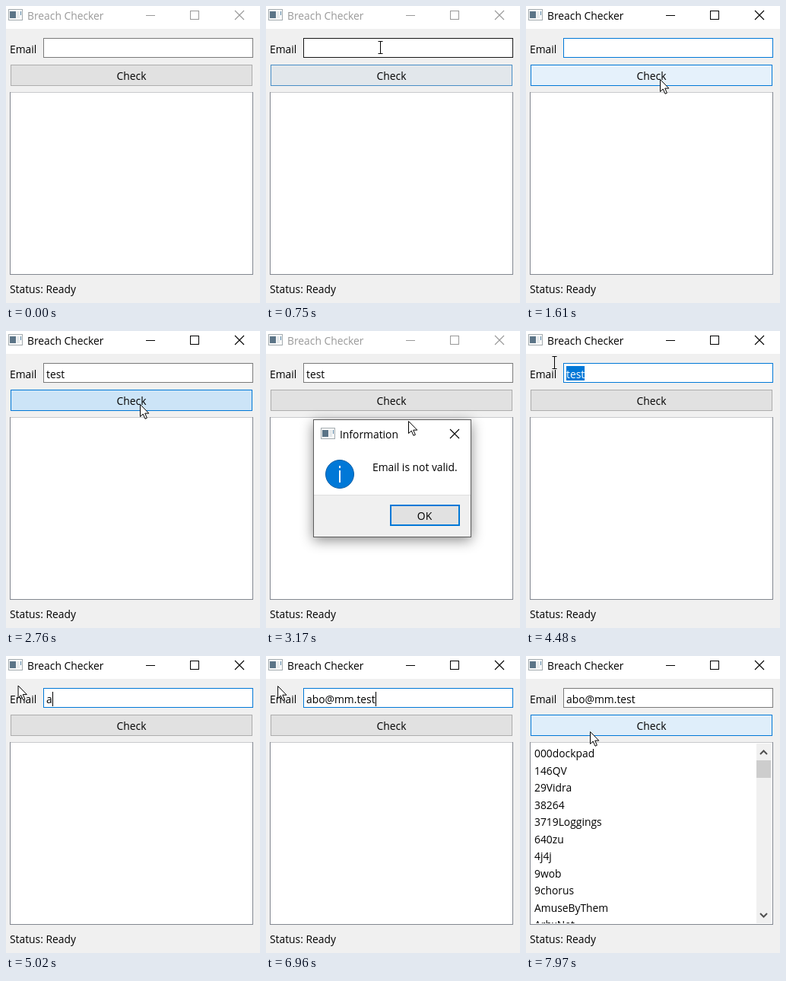
An HTML page with a canvas for the animation above (8 s loop, 334x390 px).

```html
<!DOCTYPE html>
<html lang="en">
<head>
<meta charset="utf-8">
<title>Breach Checker</title>
<style>
html, body { margin: 0; width: 100%; height: 100%; overflow: hidden; background: #f0f0f0; }
canvas { display: block; }
</style>
</head>
<body>
<canvas id="stage" width="334" height="390"></canvas>
<script>
const c = document.getElementById('stage').getContext('2d');
const LOOP = 8000;
const BLUE = '#0078d7';
const FONT = '13.85px "Open Sans", "Noto Sans", sans-serif';
const TEXT_X = 53;
const ROWS = ['000dockpad', '146QV', '29Vidra', '38264', '3719Loggings', '640zu',
  '4j4j', '9wob', '9chorus', 'AmuseByThem', 'ArbxNet'];

// Pointer path: time, x, y
const PATH = [
  [130, 230, 388], [750, 150, 54], [1200, 150, 54], [1540, 176, 96], [2900, 176, 96],
  [3170, 187, 118], [3240, 187, 118], [3450, 206, 243], [3600, 206, 243],
  [4070, 114, 85], [4140, 114, 85], [4280, 100, 57], [4350, 96, 56], [4550, 6, 33],
  [4690, 6, 33], [4900, 16, 38], [5160, 15, 39], [6960, 15, 39], [7500, 84, 99]
];

// Typed text: time, word, letters
const TYPING = [
  [0, '', 0], [1880, 'test', 2], [2010, 'test', 3], [2290, 'test', 4],
  ...[[4960, 1], [5090, 2], [5160, 3], [5490, 4], [5770, 6], [5900, 7], [6090, 8],
    [6220, 9], [6360, 10], [6490, 11]].map(([t, n]) => [t, 'abo@mm.test', n])
];

const within = (t, ...spans) => spans.some(([a, b]) => t >= a && t < b);
const ramp = (t, start, length) => Math.min(1, Math.max(0, (t - start) / length));
const fade = (t, a, b, length) => Math.max(0, ramp(t, a, length) - ramp(t, b, length));
const mix = (a, b, k) => a.map((v, i) => v + (b[i] - v) * k);
const rgb = v => `rgb(${v.map(Math.round)})`;

function pointer(t) {
  let i = PATH.findIndex(p => p[0] > t);
  if (i < 0) return PATH.at(-1).slice(1);
  if (i === 0) return null;
  const [t0, ...from] = PATH[i - 1], [t1, ...to] = PATH[i];
  return mix(from, to, (t - t0) / (t1 - t0));
}

function fill(x, y, w, h, color) {
  c.fillStyle = color;
  c.fillRect(x, y, w, h);
}

function frame(x, y, w, h, color, line = 1) {
  c.strokeStyle = color;
  c.lineWidth = line;
  c.strokeRect(x + line / 2, y + line / 2, w - line, h - line);
}

function text(s, x, y, color = '#000', align = 'left') {
  c.fillStyle = color;
  c.textAlign = align;
  c.fillText(s, x, y);
}

function lines(color, width, ...paths) {
  c.strokeStyle = color;
  c.lineWidth = width;
  c.beginPath();
  for (const p of paths)
    for (let i = 0; i < p.length; i += 2) i ? c.lineTo(p[i], p[i + 1]) : c.moveTo(p[i], p[i + 1]);
  c.stroke();
}

const cross = (x, y, color) =>
  lines(color, 1.1, [x, y, x + 12, y + 12], [x + 12, y, x, y + 12]);

function appIcon(x, y) {
  fill(x, y, 19, 15, '#fafafa');
  frame(x, y, 19, 15, '#a3abaf');
  fill(x + 2, y + 3, 8, 9, '#5b7487');
  fill(x + 11, y + 3, 4, 9, '#e6eaec');
  fill(x + 16, y + 3, 1, 5, '#5b87a8');
}

function titleBar(active) {
  const color = active ? '#000' : '#999';
  fill(0, 0, 334, 30, '#fff');
  appIcon(3, 4);
  text('Breach Checker', 28, 18, color);
  lines(color, 1, [184, 12.5, 196, 12.5]);
  frame(242, 6, 12, 12, color);
  cross(301, 6, color);
}

function emailField(t, focused, hovered, mouseX) {
  const [, word, n] = TYPING.findLast(k => k[0] <= t);
  const value = word.slice(0, n);
  const end = TEXT_X + c.measureText(value).width;
  text('Email', 5, 62);
  fill(49, 42, 276, 26, '#fff');
  frame(49, 42, 276, 26, focused ? BLUE : hovered ? '#171717' : '#7a7a7a');
  text(value, TEXT_X, 62);
  if (within(t, [4350, 4960]) && mouseX < end) {
    const left = t > 4550 ? TEXT_X : Math.max(TEXT_X, mouseX);
    c.save();
    c.beginPath();
    c.rect(left, 46, end - left, 19);
    c.clip();
    fill(left, 46, end - left, 19, BLUE);
    text(value, TEXT_X, 62, '#fff');
    c.restore();
  }
  if (within(t, [1880, 2690], [4960, 7500])) fill(Math.round(end), 47, 1, 19, '#000');
}

function checkButton(t) {
  const hover = Math.max(fade(t, 650, 705, 150), fade(t, 1450, 2800, 150),
    fade(t, 4000, 4200, 150), fade(t, 7350, LOOP, 120));
  const press = t >= 7500 ? 0.25 : within(t, [2690, 2800]) ? 1 : 0;
  const face = mix(mix([225, 225, 225], [229, 241, 251], hover), [204, 228, 247], press);
  fill(6, 77, 318, 28, rgb(face));
  frame(6, 77, 318, 28, rgb(mix([173, 173, 173], [0, 120, 215], Math.min(1, hover * 1.6))));
  text('Check', 165, 97, '#000', 'center');
}

function resultList(filled) {
  fill(5, 113, 320, 240, '#fff');
  frame(5, 113, 320, 240, '#828790');
  fill(6, 113, 318, 1, '#c9cacd');
  if (!filled) return;
  c.save();
  c.beginPath();
  c.rect(7, 115, 316, 236);
  c.clip();
  ROWS.forEach((row, i) => text(row, 11, Math.round(133 + i * 22.5)));
  fill(303, 115, 19, 236, '#f0f0f0');
  fill(303, 137, 19, 23, '#cdcdcd');
  lines('#505050', 2, [308, 129, 312.5, 124.5, 317, 129], [308, 338, 312.5, 342.5, 317, 338]);
  c.restore();
}

function dialog(alpha, pressed) {
  if (!alpha) return;
  c.save();
  c.globalAlpha = alpha;
  c.shadowColor = 'rgba(0,0,0,.45)';
  c.shadowBlur = 16;
  c.shadowOffsetY = 4;
  fill(62, 116, 208, 155, '#fff');
  c.shadowColor = 'transparent';
  fill(62, 215, 208, 56, '#f0f0f0');
  fill(62, 215, 208, 1, '#dfdfdf');
  frame(62, 116, 208, 155, '#5c5c5c');
  appIcon(72, 127);
  text('Information', 97, 141);
  cross(242, 129, '#000');
  c.beginPath();
  c.arc(97, 188, 18.5, 0, 7);
  c.fillStyle = BLUE;
  c.fill();
  c.strokeStyle = '#0a5ea5';
  c.lineWidth = 1;
  c.stroke();
  fill(96, 177, 2, 3, '#fff');
  fill(96, 183, 2, 16, '#fff');
  text('Email is not valid.', 140, 184);
  fill(163, 228, 92, 28, pressed ? '#cce4f7' : '#e1e1e1');
  frame(163, 228, 92, 28, BLUE, 2);
  text('OK', 208.5, 248, '#000', 'center');
  c.restore();
}

function arrow(x, y) {
  const shape = new Path2D('M.5 .5V16.5L4.2 13L7 19.3L9.4 18.2L6.7 12.1H11.8Z');
  c.save();
  c.translate(x, y);
  c.fillStyle = '#fff';
  c.fill(shape);
  c.strokeStyle = '#000';
  c.lineWidth = 1;
  c.stroke(shape);
  c.restore();
}

function beam(x, y) {
  x = Math.round(x) + .5;
  y = Math.round(y) + .5;
  lines('#000', 1, [x, y - 8, x, y + 8], [x - 3, y - 8, x + 3, y - 8], [x - 3, y + 8, x + 3, y + 8]);
}

function draw(t) {
  const mouse = pointer(t);
  const [mx, my] = mouse || [-99, -99];
  const overField = mx > 49 && mx < 325 && my > 42 && my < 68;
  const focused = within(t, [1090, 2690], [4350, 7500]);
  c.font = FONT;
  fill(0, 0, 334, 390, '#f0f0f0');
  titleBar(within(t, [1090, 2830], [3660, LOOP]));
  emailField(t, focused, overField, mx);
  checkButton(t);
  resultList(t >= 7830);
  text('Status: Ready', 5, 377);
  dialog(fade(t, 2800, 3600, 120), t >= 3520);
  if (mouse) (overField || within(t, [4350, 4700]) ? beam : arrow)(mx, my);
}

(function tick() {
  draw(performance.now() % LOOP);
  requestAnimationFrame(tick);
})();
</script>
</body>
</html>
```
